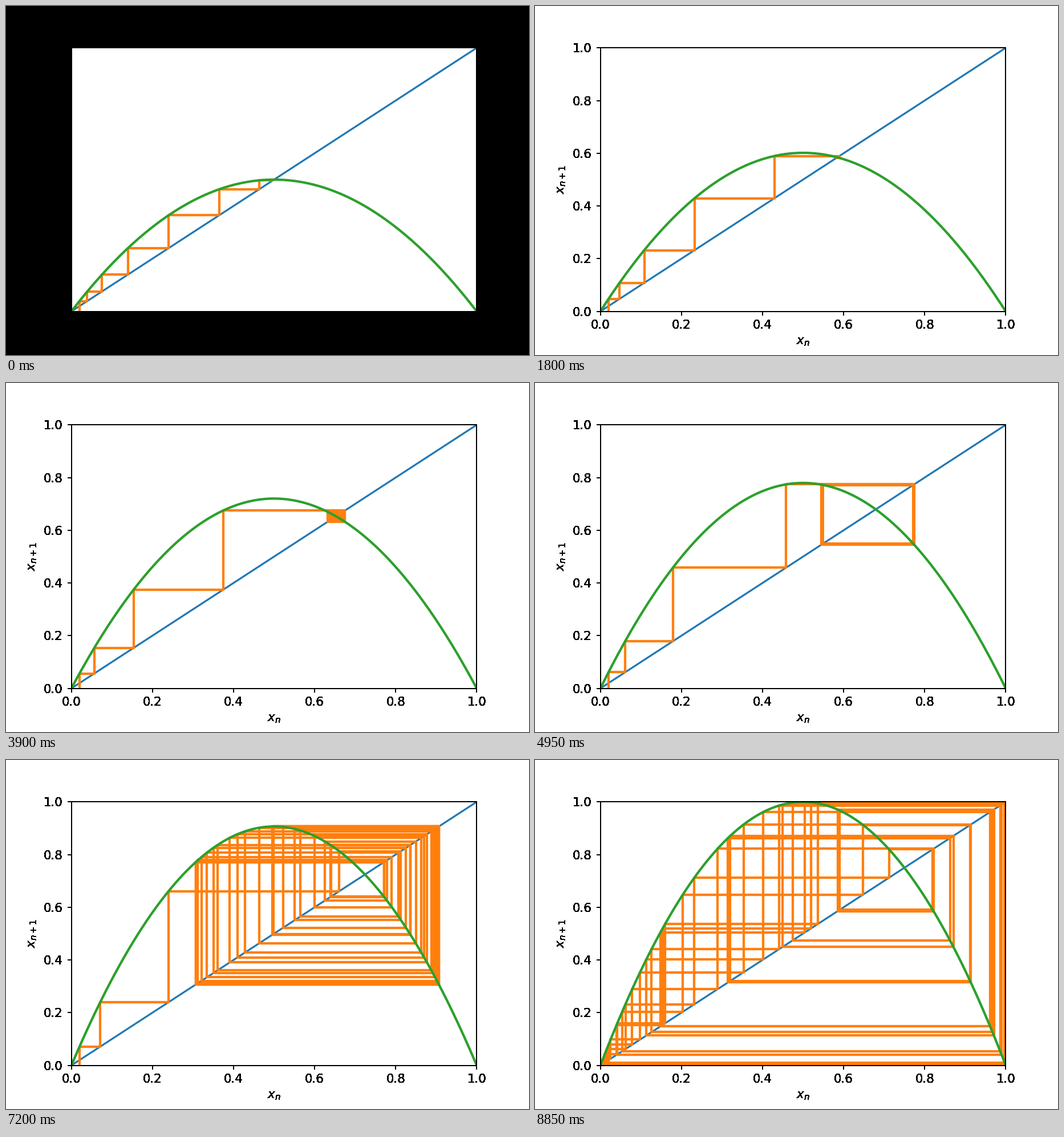
A matplotlib script for the animation above (9000 ms loop, 917 by 611 pixels).

```python
import numpy as np
import matplotlib.pyplot as plt
from matplotlib.animation import FuncAnimation
from matplotlib.patches import Rectangle

W, H, DPI = 917, 611, 152.8
FRAMES, INTERVAL = 60, 150
STEPS, X0 = 50, 0.02

plt.rcParams.update({"font.family": "DejaVu Sans", "font.size": 10})


def logistic(r, x):
    return r * x * (1 - x)


def cobweb(r):
    """Vertices of the staircase between the parabola and the diagonal."""
    xs, ys = [X0], [0]
    for _ in range(STEPS):
        x = xs[-1]
        y = logistic(r, x)
        xs += [x, y]
        ys += [y, y]
    return xs, ys


def harden(img, dpi):
    """Make soft edges fully opaque."""
    img[..., :3] = 0
    img[..., 3] = img[..., 3] > 0.1
    return img, 0, 0


fig = plt.figure(figsize=((W + 0.01) / DPI, (H + 0.01) / DPI), dpi=DPI,
                 facecolor="white")
backdrop = fig.add_artist(Rectangle((0, 0), 1, 1, transform=fig.transFigure,
                                    lw=0, zorder=-1))
ax = fig.add_axes([0.125, 0.125, 0.775, 0.755])
ax.set(xlim=(0, 1), ylim=(0, 1), xlabel="$x_n$", ylabel="$x_{n+1}$")
for part in (ax.xaxis, ax.yaxis, *ax.spines.values()):
    part.set_agg_filter(harden)

grid = np.linspace(0, 1, 200)
ax.plot(grid, grid, color="C0", lw=1.5)
web, = ax.plot([], [], color="C1", lw=2)
curve, = ax.plot([], [], color="C2", lw=2)

rates = np.linspace(2, 4, FRAMES)


def update(i):
    r = float(rates[i])
    backdrop.set_facecolor("black" if i == 0 else "white")
    web.set_data(*cobweb(r))
    curve.set_data(grid, logistic(r, grid))
    return backdrop, web, curve


anim = FuncAnimation(fig, update, frames=FRAMES, interval=INTERVAL,
                     repeat=True, repeat_delay=0, blit=False)
plt.show()
```
